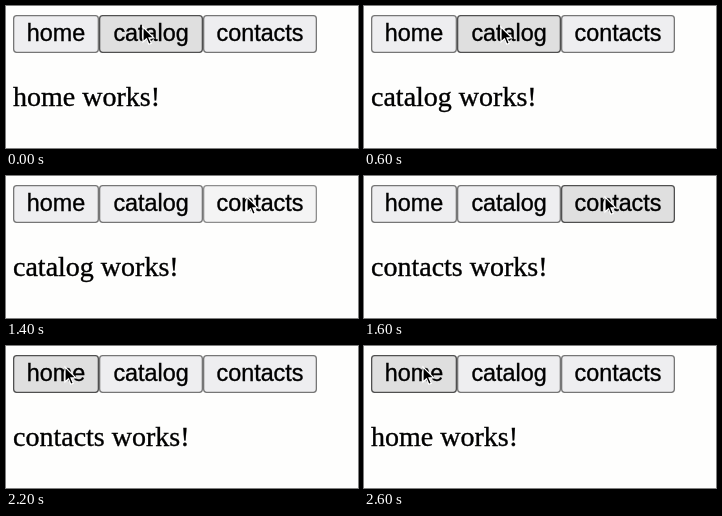
An HTML page for the animation above (2.8 s loop, 352x142 px).

```html
<!DOCTYPE html>
<html lang="en">
<head>
<meta charset="utf-8">
<style>
  html, body { margin: 0; width: 100%; height: 100%; overflow: hidden; background: #fefefd; }
  svg { display: block; width: 352px; height: 142px; }
  text { stroke: #000; stroke-width: 0.35; }
  .button text { font: 23.33px "Liberation Sans", Arial, sans-serif; text-anchor: middle; }
  .button rect { fill: #eeeef0; stroke: #767676; stroke-width: 1.3; }
  .hover rect { fill: #dfdfdf; stroke: #505050; }
  .pressed rect { fill: #f4f4f4; stroke: #8d8d8d; }
  #message { font: 28px "Liberation Serif", Times, serif; }
</style>
</head>
<body>
<svg viewBox="0 0 352 142">
  <g id="buttons"></g>
  <text id="message" x="7" y="100"></text>
  <path id="cursor" d="M0 0V15L3.5 11.8 5.8 17.3 8.3 16.3 6 10.9H10.8Z" stroke="#fff" stroke-width="1.2"/>
</svg>
<script>
const LOOP = 2800, STEP = 200;
const CLICK_EVERY = 1000, FIRST_PRESS = 400;
const pages = ["home", "catalog", "contacts"];
const edges = [7, 93, 197, 311];

// Cursor path: [time, x], straight between the points
const path = [[600, 137], [800, 172], [1000, 230], [1200, 241], [1600, 241], [1800, 157], [2200, 59]];

function cursorX(time) {
  const next = path.findIndex(([t]) => t > time);
  if (next < 1) return path.at(next)[1];
  const [t0, x0] = path[next - 1], [t1, x1] = path[next];
  return x0 + (x1 - x0) * (time - t0) / (t1 - t0);
}

const message = document.getElementById("message");
const cursor = document.getElementById("cursor");
const group = document.getElementById("buttons");
group.innerHTML = pages.map((name, i) => `
  <g class="button">
    <rect x="${edges[i] + 0.65}" y="9.65" width="${edges[i + 1] - edges[i] - 1.3}" height="36.7" rx="3"/>
    <text x="${(edges[i] + edges[i + 1]) / 2}" y="35">${name}</text>
  </g>`).join("");

function draw(now) {
  const time = Math.floor(now % LOOP / STEP) * STEP;
  const x = cursorX(time);
  // Each press lasts one step; releasing it opens the next page
  const pressed = time % CLICK_EVERY === FIRST_PRESS;
  const clicks = Math.floor((time - FIRST_PRESS - STEP) / CLICK_EVERY) + 1;

  pages.forEach((_, i) => {
    const over = x >= edges[i] && x < edges[i + 1];
    const state = over ? (pressed ? " pressed" : " hover") : "";
    group.children[i].setAttribute("class", "button" + state);
  });
  message.textContent = pages[clicks % pages.length] + " works!";
  cursor.setAttribute("transform", `translate(${x} 21)`);
  requestAnimationFrame(draw);
}
draw(performance.now());
</script>
</body>
</html>
```
